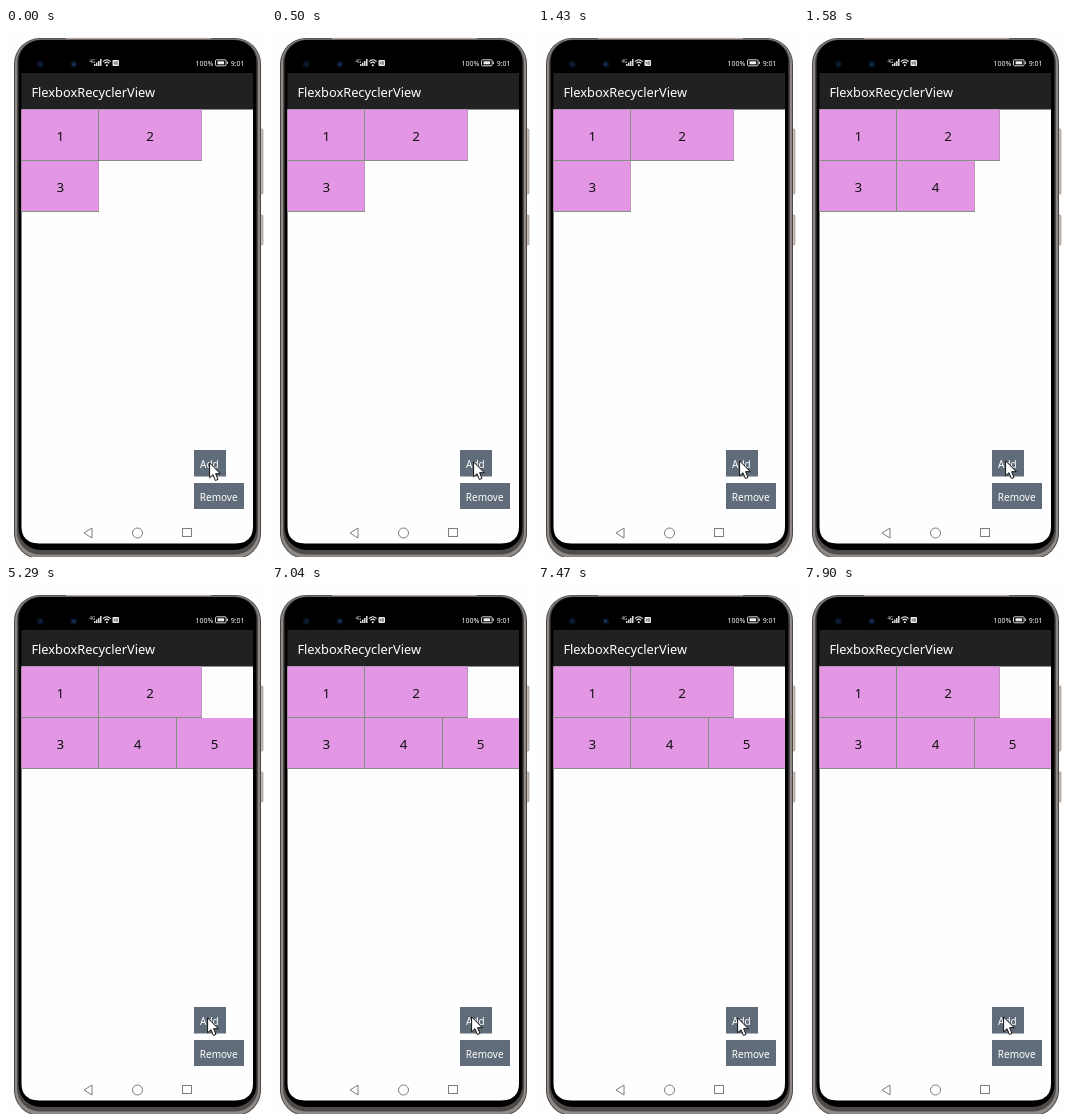
An HTML page that plays this animation: 260x529 px, repeating every 8000 ms.

```html
<!DOCTYPE html>
<html lang="en">
<head>
<meta charset="utf-8">
<title>Flexbox list</title>
<style>
  html, body { margin: 0; width: 100%; height: 100%; overflow: hidden; background: #fefefe; }
  svg { display: block; width: 100%; height: 100%; }
  text { font-family: "Noto Sans", "Open Sans", sans-serif; }
  .line { fill: none; stroke: #7c7c7c; stroke-width: 1; }
  .icon { fill: none; stroke: #eee; stroke-width: .9; }
  .status { font-size: 7px; fill: #fff; }
  .button { font-size: 10px; fill: #fff; }
  .cell { font-size: 13.4px; fill: #111; text-anchor: middle; }
  .edge { fill: none; stroke: #82907f; stroke-width: 1; }
</style>
</head>
<body>
<svg viewBox="0 0 260 529">
  <rect width="260" height="529" fill="#fefefe"/>

  <!-- phone body -->
  <g fill="#c9beb6" stroke="#968c85" stroke-width=".6">
    <rect x="253" y="101" width="4" height="65" rx="1"/>
    <rect x="253" y="187" width="4" height="30" rx="1"/>
  </g>
  <rect x="8" y="10" width="247" height="521" rx="26" fill="#4a4746"/>
  <rect x="9" y="10.8" width="245" height="519.4" rx="25" fill="#8e8985"/>
  <rect x="11" y="11.5" width="241" height="515" rx="23" fill="#4d4a49"/>
  <rect x="12.5" y="12" width="238" height="510" rx="22" fill="#000"/>
  <path d="M60 10.4H205" stroke="#c9beb6" stroke-width=".9"/>
  <path d="M15.5 81H247V498Q247 515.5 229 515.5H33.5Q15.5 515.5 15.5 498Z" fill="#fefefe"/>
  <rect x="15.5" y="45" width="231.5" height="36.5" fill="#222121"/>

  <!-- status bar -->
  <g fill="#07101f" stroke="#0c1b30" stroke-width=".8">
    <circle cx="34.3" cy="36.3" r="3"/>
    <circle cx="67.8" cy="36.3" r="3"/>
  </g>
  <circle cx="34.3" cy="36.3" r="1" fill="#18375c"/>
  <circle cx="67.8" cy="36.3" r="1.2" fill="#1d4674"/>
  <text x="83.5" y="34.5" font-size="4.4" fill="#eee">4G</text>
  <path d="M88.8 38V36M90.8 38V34.5M92.8 38V33M94.8 38V31" class="icon" style="stroke-width:1.4"/>
  <path d="M97 33.6Q100.8 29.9 104.6 33.6M98.5 35.3Q100.8 33.1 103.1 35.3" class="icon" style="stroke-width:1.1"/>
  <circle cx="100.8" cy="37.2" r="1" fill="#eee"/>
  <rect x="106.5" y="32" width="6.5" height="6" rx="1" fill="#eee"/>
  <path d="M108.2 33.5V36.5M109.2 33.5V36.5M108.2 35H109.2M110.5 33.5V36.5H111.5V33.5Z" fill="none" stroke="#333" stroke-width=".5"/>
  <text x="189.5" y="37.5" class="status">100%</text>
  <rect x="209.5" y="31.8" width="10.6" height="6" rx="1" class="icon"/>
  <rect x="211.5" y="33.3" width="6.6" height="3" fill="#eee"/>
  <path d="M221.4 33.6V36" class="icon"/>
  <text x="224.7" y="37.5" class="status">9:01</text>

  <text x="25.4" y="69" font-size="12.8" fill="#fff">FlexboxRecyclerView</text>

  <g id="cells"></g>

  <!-- buttons -->
  <g fill="#606c79">
    <rect x="188" y="422" width="32" height="26.5"/>
    <rect x="188" y="455" width="50" height="26"/>
  </g>
  <text x="194" y="440" class="button">Add</text>
  <text x="193.8" y="472.7" class="button">Remove</text>

  <!-- navigation -->
  <path d="M86 500V510L78 505Z" class="line"/>
  <circle cx="131.5" cy="505" r="5" class="line"/>
  <rect x="176.5" y="500.5" width="9" height="8" class="line"/>

  <path id="cursor" d="M.6 .9V15.8L4 12.7L6.4 18.5L9 17.4L6.6 11.7H11.3Z"
        fill="#fff" stroke="#111" stroke-width="1" stroke-linejoin="round"/>
</svg>
<script>
const LOOP = 8000, LEFT = 15.5, RIGHT = 247;
// left, right, top, bottom, time of appearance
const items = [
  [LEFT, 93, 81.5, 133, 0], [92, 196, 81.5, 133, 0],
  [LEFT, 93, 133, 184, 0], [92, 171, 133, 184, 1580], [170, RIGHT, 133, 184, 5290]
];
// time, x, y
const moves = [
  [0, 203, 434], [500, 201, 433], [1430, 201, 432],
  [7040, 199, 431], [7470, 199, 432], [7900, 199, 431]
];
const cursor = document.getElementById("cursor");
const cells = document.getElementById("cells");

function add(parent, tag, attrs, text = "") {
  const el = document.createElementNS("http://www.w3.org/2000/svg", tag);
  for (const key in attrs) el.setAttribute(key, attrs[key]);
  el.textContent = text;
  return parent.appendChild(el);
}

const groups = items.map(([x, right, y, bottom], i) => {
  const g = add(cells, "g", {});
  add(g, "rect", { x, y, width: right - x, height: bottom - y, fill: "#e296e4" });
  add(g, "path", { d: `M${x} ${bottom - 0.5}H${right}`, class: "edge" });
  if (x > LEFT) add(g, "path", { d: `M${x + 0.5} ${y}V${bottom}`, class: "edge" });
  if (right < RIGHT) add(g, "path", { d: `M${right - 0.5} ${y}V${bottom}`, class: "edge", opacity: 0.4 });
  add(g, "text", { x: (x + right) / 2, y: bottom - 20, class: "cell" }, i + 1);
  return g;
});

function draw(t) {
  groups.forEach((g, i) => g.setAttribute("display", t >= items[i][4] ? "inline" : "none"));
  const [, x, y] = moves.filter(m => m[0] <= t).pop();
  cursor.setAttribute("transform", `translate(${x} ${y})`);
}

const start = performance.now();
function tick() {
  draw((performance.now() - start) % LOOP);
  requestAnimationFrame(tick);
}
draw(0);
requestAnimationFrame(tick);
</script>
</body>
</html>
```
